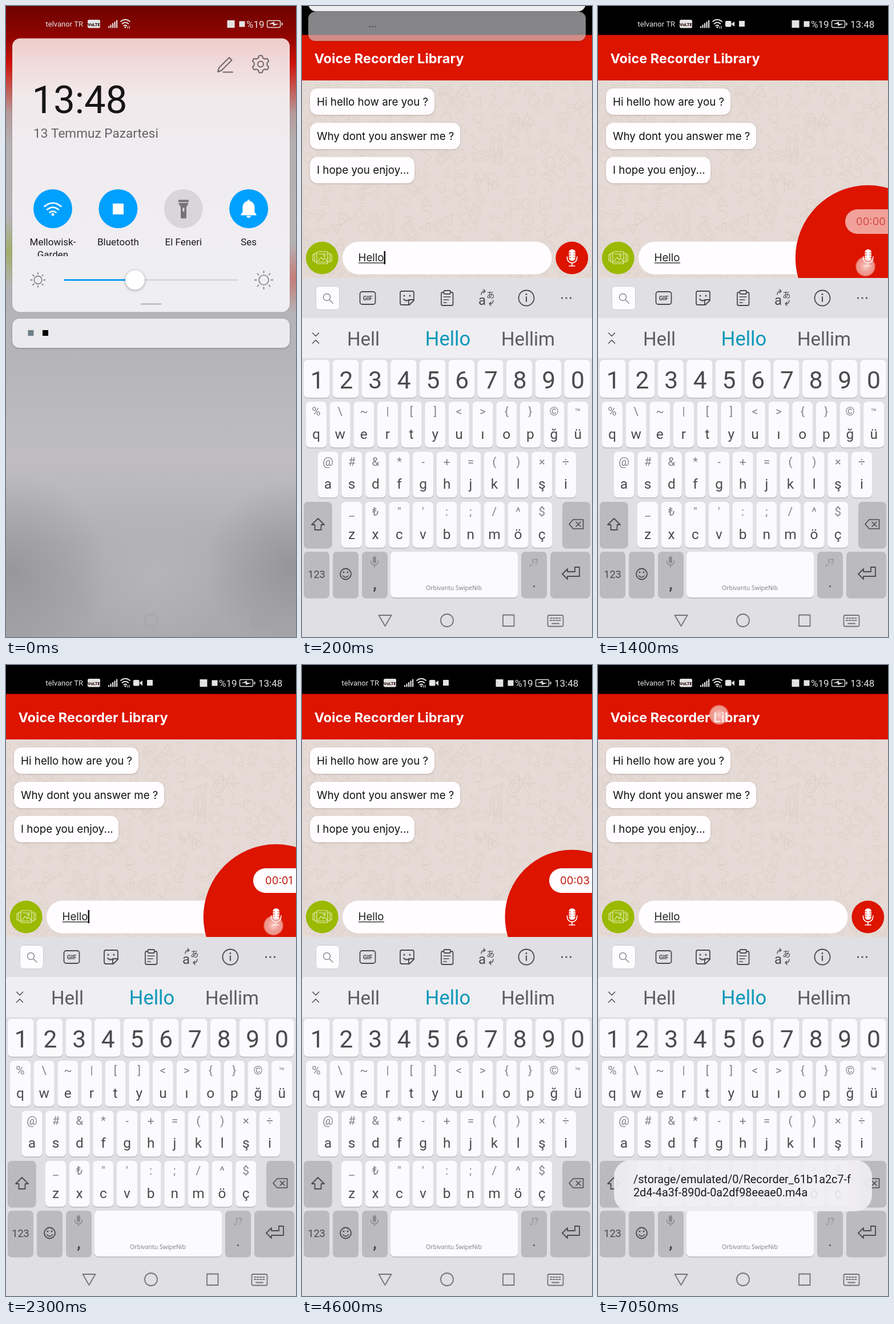
These frames come from a looping animation (508 px wide and 1102 px high, 7100 ms). An HTML page with a canvas:

```html
<!DOCTYPE html>
<html lang="en">
<head>
<meta charset="utf-8">
<title>Voice Recorder Library</title>
<style>
html, body { margin: 0; width: 100%; height: 100%; overflow: hidden; background: #000; }
canvas { display: block; }
</style>
</head>
<body>
<canvas id="stage" width="508" height="1102"></canvas>
<script>
const W = 508, H = 1102, LOOP = 7100;
const RED = '#dc1400', KEY = '#fbfafd', DARK_KEY = '#bbbabe', INK = '#4b4b4e', BLUE = '#00a0ff';
const UI = 'Roboto, sans-serif', CHAT = 'Inter, sans-serif';
const stage = document.getElementById('stage').getContext('2d');
let g = stage;

// ---------- helpers ----------
const clamp = v => Math.max(0, Math.min(1, v));
const ramp = (t, from, to) => clamp((t - from) / (to - from));
const ease = p => 0.5 - 0.5 * Math.cos(Math.PI * p);

function layer(draw) {
  const c = document.createElement('canvas');
  c.width = W; c.height = H;
  g = c.getContext('2d');
  draw();
  g = stage;
  return c;
}
function rect(x, y, w, h, fill) { g.fillStyle = fill; g.fillRect(x, y, w, h); }
function box(x, y, w, h, r, fill) {
  g.beginPath(); g.roundRect(x, y, w, h, r);
  g.fillStyle = fill; g.fill();
}
function dot(x, y, r, fill) {
  g.beginPath(); g.arc(x, y, r, 0, 7);
  g.fillStyle = fill; g.fill();
}
function line(d, color, width = 1.8) {
  g.strokeStyle = color; g.lineWidth = width;
  g.lineCap = g.lineJoin = 'round';
  g.stroke(new Path2D(d));
}
function shape(d, fill) { g.fillStyle = fill; g.fill(new Path2D(d)); }
function ring(x, y, r, color, width = 1.8) {
  g.beginPath(); g.arc(x, y, r, 0, 7);
  g.strokeStyle = color; g.lineWidth = width; g.stroke();
}
function frame(x, y, w, h, r, color, width = 1.8) {
  g.beginPath(); g.roundRect(x, y, w, h, r);
  g.strokeStyle = color; g.lineWidth = width; g.stroke();
}
function text(s, x, y, size, color, { font = UI, weight = 400, align = 'left' } = {}) {
  g.font = `${weight} ${size}px ${font}`;
  g.textAlign = align; g.fillStyle = color;
  g.fillText(s, x, y);
}
const center = (s, x, y, size, color, opt) => text(s, x, y, size, color, { align: 'center', ...opt });
function gradient(y0, y1, stops) {
  const f = g.createLinearGradient(0, y0, 0, y1);
  stops.forEach(([at, color]) => f.addColorStop(at, color));
  return f;
}
function glow(x, y, r, rgb, alpha) {
  const f = g.createRadialGradient(x, y, 0, x, y, r);
  f.addColorStop(0, `rgba(${rgb},${alpha})`);
  f.addColorStop(1, `rgba(${rgb},0)`);
  rect(x - r, y - r, 2 * r, 2 * r, f);
}
function shadowed(blur, dy, color, draw) {
  g.save();
  g.shadowBlur = blur; g.shadowOffsetY = dy; g.shadowColor = color;
  draw();
  g.restore();
}
function faded(alpha, draw) {
  if (alpha <= 0) return;
  g.save(); g.globalAlpha *= alpha; draw(); g.restore();
}

// ---------- chat screen ----------
function doodles() {
  let seed = 11;
  const rnd = n => (seed = seed * 16807 % 2147483647) / 2147483647 * n;
  const kinds = [
    'M-9 0a9 9 0 1 0 18 0a9 9 0 1 0-18 0M-4 2q4 5 8 0',
    'M-14-8h28v16h-28zM-10-4h20v8h-20z',
    'M-14 4q5-14 10-2t10-2t8 0',
    'M-12-3q6-9 12 0t12 0M-12 3q6-9 12 0t12 0',
    'M-10 8l8-18 12 14zM-3-1l6 5',
    'M-8-9h14v12q-7 8-14 0zM6-6q7 0 5 6t-5 2'
  ];
  g.save();
  g.beginPath(); g.rect(0, 130, W, 345); g.clip();
  for (let row = 0; row < 14; row++) for (let col = 0; col < 18; col++) {
    g.save();
    g.translate(col * 30 + rnd(16), 136 + row * 25 + rnd(14));
    g.rotate(rnd(6.28));
    const s = 0.7 + rnd(0.5);
    g.scale(s, s);
    line(kinds[Math.floor(rnd(kinds.length))], 'rgba(200,184,177,.27)', 1.3);
    g.restore();
  }
  g.restore();
}

function message(s, y, w) {
  shadowed(3, 1, 'rgba(120,100,90,.35)', () => box(14, y, w, 46, 13, '#fffdff'));
  text(s, 26, y + 29.5, 18.8, '#111', { font: CHAT });
}

const chat = layer(() => {
  rect(0, 0, W, 51, '#000');
  rect(0, 50.5, W, 79.5, RED);
  text('Voice Recorder Library', 21.5, 100, 23.5, '#fff', { font: CHAT, weight: 700 });
  rect(0, 130, W, 345, '#e5dad5');
  doodles();
  message('Hi hello how are you ?', 144, 218);
  message('Why dont you answer me ?', 204, 263);
  message('I hope you enjoy...', 263.5, 183);
  box(71, 411.5, 366.5, 57, 28.5, '#fffdff');
  text('Hello', 98.5, 446, 18.7, '#222', { font: CHAT });
  rect(99, 448, 45, 1.3, '#222');
  dot(35.2, 440, 28.4, '#9ab900');
  frame(26, 429, 19, 21, 2, '#e8f0c4', 1.2);
  line('M26 432h-4v15h4M22 434h-3v11h3M45 432h4v15h-4M49 434h3v11h-3M28 446l5-7 4 4 3-3 4 6M29 433h13M29 447h13', '#e8f0c4', 1.1);
  ring(39, 436, 1.8, '#e8f0c4', 1);
});

function mic() {
  box(467.5, 425, 11.5, 20, 5.5, '#fff');
  line('M467 431h4M467 435h4M467 439h4M476 431h4M476 435h4M476 439h4', RED, 1.1);
  line('M464.5 438v2a8.6 8.6 0 0 0 17.2 0v-2M473 449v5M468 454h10', '#fff', 1.7);
}

// ---------- keyboard ----------
function key(x, y, w, h, fill = KEY) {
  box(x, y + 1.5, w, h, 7, '#b9b8bd');
  box(x, y, w, h, 7, fill);
}
function letterRow(letters, symbols, x, y) {
  [...letters].forEach((ch, i) => {
    const cx = x + i * 41.65;
    key(cx - 18, y, 36, 80);
    center(symbols[i], cx, y + 24, symbols[i] === '™' ? 17 : 21, '#858488');
    center(ch, cx, y + 64.5, 24.5, INK);
  });
}

const keyboard = layer(() => {
  rect(0, 475, W, H - 475, '#e0dfe3');
  rect(0, 545, W, 70, '#efeef2');

  box(24, 489, 42, 42, 7, '#fdfcff');
  frame(24.5, 489.5, 41, 41, 7, '#cccbd0', 1);
  ring(43.5, 508.5, 6, '#8b8a8e', 1.5);
  line('M48 513l6 6', '#8b8a8e', 1.5);
  frame(101.5, 499, 27, 22, 4, INK);
  center('GIF', 115, 514, 11, INK, { weight: 700 });
  line('M175 498h18q3 0 3 3v13l-8 8h-13q-3 0-3-3v-18q0-3 3-3M196 513h-6q-3 0-3 3v6M178 512q5 5 9 1', INK);
  dot(179, 506, 1.5, INK); dot(189, 506, 1.5, INK);
  frame(244, 500, 20.5, 23, 2.5, INK);
  box(248.5, 497, 11.5, 6, 2, '#e0dfe3');
  frame(248.5, 497, 11.5, 6, 2, INK);
  line('M248 508h12M248 513h9M248 518h5', INK, 1.5);
  text('a', 309, 522, 24, INK);
  text('あ', 323, 510, 14.5, INK, { font: '"Noto Sans CJK JP", sans-serif' });
  line('M314 504q0-6 6-6M318 495l3 3-3 3M335 514q0 6-6 6M331 517l-3 3 3 3', INK, 1.4);
  ring(393, 510, 13.5, INK);
  line('M393 508v8', INK, 2); dot(393, 503.5, 1.4, INK);
  [455.5, 463, 470.5].forEach(x => dot(x, 510, 1.6, INK));

  line('M18.5 571l5.5 5.5 5.5-5.5M18.5 589l5.5-5.5 5.5 5.5', INK, 1.5);
  center('Hell', 107.5, 592.5, 33, '#5c5b5f');
  center('Hello', 255.5, 592.5, 34.5, '#0b97b8');
  center('Hellim', 396, 592.5, 33, '#5c5b5f');

  [...'1234567890'].forEach((ch, i) => {
    const x = 3 + i * 50.7;
    key(x, 618, 45.5, 66);
    center(ch, x + 23.7, 668, 42.5, INK);
  });
  letterRow('qwertyuıopğü', '%\\~|[]<>{}©™', 25, 691);
  letterRow('asdfghjklşi', '@#&*-+=()×÷', 45.5, 778.5);
  letterRow('zxcvbnmöç', '_₺"\':;/^$', 87, 866);

  key(3, 866, 49.5, 80, DARK_KEY);
  line('M28 895l-11 11h5.5v9h11v-9h5.5z', INK);
  key(456, 866, 49, 80, DARK_KEY);
  line('M468 905l7-8h17.5v16h-17.5zM480 901l8 8M488 901l-8 8', INK, 1.6);
  key(3, 953, 45, 80, DARK_KEY);
  center('123', 25.5, 999, 18, INK);
  key(54, 953, 45, 80, DARK_KEY);
  ring(76.5, 992, 9.5, INK);
  line('M71.5 995q5 5 10 0', INK, 1.5);
  dot(73, 989, 1.4, INK); dot(80, 989, 1.4, INK);
  key(105, 953, 45, 80, DARK_KEY);
  box(124, 961, 6, 12, 3, '#8b8a8e');
  line('M120.5 969q0 7 6.5 7t6.5-7M127 976v4', '#8b8a8e', 1.5);
  center(',', 127.5, 1018, 27, INK, { weight: 700 });
  key(155, 953, 223, 80);
  center('Orbivantu SwipeNib', 266, 1020, 10.5, '#7d7c80', { font: '"Open Sans", sans-serif' });
  key(384, 953, 45, 80, DARK_KEY);
  center(',!?', 406.5, 977, 16, '#8b8a8e');
  center('.', 406.5, 1015, 25, INK);
  key(435, 953, 70, 80, DARK_KEY);
  line('M456 992l9-9v5h13v-8h8v16h-21v5z', INK);

  navigation();
});

function navigation() {
  const c = '#757478';
  line('M134.5 1064h22l-11 19z', c);
  ring(254, 1073, 11, c);
  frame(352, 1063.5, 19.5, 19.5, 0, c);
  keyboardIcon(c);
}
function keyboardIcon(c) {
  frame(430.5, 1064, 27, 19.5, 2.5, c);
  g.setLineDash([2.5, 2.5]);
  line('M435 1069h19M435 1073h19', c, 2);
  g.setLineDash([]);
  line('M438 1078.5h12', c, 1.8);
}

// ---------- status bar ----------
function statusLeft() {
  const c = '#e4e2e2';
  text('telvanor TR', 69.5, 36, 13, c);
  box(143, 24, 22, 14.5, 2.5, c);
  center('VoLTE', 154, 34.5, 7.8, '#200', { weight: 700 });
  for (let i = 0; i < 5; i++) box(179 + i * 3.5, 35 - i * 2.6, 2.2, 3.5 + i * 2.6, 1, c);
  line('M201 27q8-6.5 16 0M203.5 31q5.5-4.5 11 0M206.5 34.5q2.5-2 5 0', c, 1.9);
  dot(209, 37, 1.6, c);
  line('M213 36v3M216 35v4', c, 1.2);
}
function statusRight(dx) {
  const c = '#e4e2e2';
  g.save(); g.translate(dx, 0);
  rect(339.5, 25, 13, 13, c);
  rect(360.5, 26.5, 10, 10, c);
  text('%19', 373, 37.5, 17, c);
  frame(409.5, 25.5, 23, 12, 2.5, c, 1.4);
  box(434.5, 29, 2, 5, 1, c);
  shape('M412 31.5l10-4v3.500h8l-10 4v-3.500z', c);
  g.restore();
}
function statusFull() {
  statusLeft();
  box(223, 26, 10.5, 10.5, 2, '#e4e2e2');
  shape('M234 31l5-4v9l-5-4z', '#e4e2e2');
  rect(247, 26, 10, 10, '#e4e2e2');
  statusRight(0);
  text('13:48', 442, 37.5, 17, '#e4e2e2');
}

// ---------- notification shade ----------
const blurred = layer(() => {
  rect(0, 0, W, H, gradient(0, H, [
    [0, '#6d0300'], [.05, '#920500'], [.09, '#cc1209'], [.12, '#c9453d'],
    [.17, '#b59a9a'], [.22, '#b3b0b2'], [.55, '#b5b4b6'], [.72, '#bfbdc0'], [.85, '#b0afb2'], [1, '#a9a8ab']
  ]));
  glow(0, 430, 60, '150,170,70', .7);
  glow(508, 475, 60, '215,70,60', .5);
  glow(10, 990, 170, '130,129,132', .5);
  glow(500, 980, 150, '130,129,132', .55);
  glow(260, 1000, 130, '188,187,190', .5);
  statusLeft();
  statusRight(48);
  ring(254, 1073, 11, '#a6a5a8');
  keyboardIcon('#a1a0a3');
});

function sun(x, y, r) {
  ring(x, y, r, '#858387', 1.7);
  for (let i = 0; i < 8; i++) {
    const c = Math.cos(i * Math.PI / 4), s = Math.sin(i * Math.PI / 4);
    line(`M${x + c * r * 1.5} ${y + s * r * 1.5}L${x + c * r * 1.85} ${y + s * r * 1.85}`, '#858387', 1.8);
  }
}

const panel = layer(() => {
  shadowed(2, 0, 'rgba(60,40,40,.2)', () => box(11, 56.5, 486, 478, 14,
    gradient(57, 534, [[0, '#eeccc8'], [.09, '#f1dadb'], [.2, '#f1e8ea'], [.45, '#f0edf1'], [1, '#efeef1']])));
  line('M371 115l2-7 18-18 4.500 4.500-18 18zM380.500 115.500h16.500', '#6d676a', 2);
  let gear = '';
  for (let i = 0; i <= 96; i++) {
    const a = i * Math.PI / 48, r = 13.2 + 1.9 * Math.tanh(3 * Math.cos(a * 6 + Math.PI));
    gear += `${i ? 'L' : 'M'}${446 + r * Math.cos(a)} ${101.5 + r * Math.sin(a)}`;
  }
  line(gear, '#6d676a', 2);
  ring(446, 101.5, 5, '#6d676a', 2);
  text('13:48', 45.5, 187, 67, '#161415');
  text('13 Temmuz Pazartesi', 48, 230, 22.6, '#656265');

  const labels = ['Mellowisk-', 'Bluetooth', 'El Feneri', 'Ses'];
  labels.forEach((label, i) => {
    const x = 82 + i * 114.4;
    dot(x, 354, 34, i === 2 ? '#d8d6d9' : BLUE);
    center(label, x, 418, 17, '#1c1a1c');
  });
  g.save();
  g.beginPath(); g.rect(20, 424, 130, 13); g.clip();
  center('Garden', 82, 440, 17, '#1c1a1c');
  g.restore();

  line('M67.500 350q14.500-12 29 0M72 355.500q10-8 20 0M76.500 360.500q5.500-4 11 0', '#fff', 2.6);
  dot(82, 364, 2.5, '#fff');
  rect(187, 345, 19, 19, '#fff');
  shape('M302 338.500h18v4h-18zM302 344h18l-4 7v18q0 2-2 2h-6q-2 0-2-2v-18z', '#757377');
  box(309.5, 352, 3, 7, 1.5, '#d8d6d9');
  shape('M425 338q2 0 2 2.500q8.500 2 8.500 11.500v8l3 4v1.500h-27v-1.500l3-4v-8q0-9.500 8.500-11.500q0-2.500 2-2.500M421 366.500h8q-1 3.500-4 3.500t-4-3.500', '#fff');

  sun(56, 478.5, 6.8);
  sun(451.5, 478.5, 8.5);
  line('M103 478.500H405', '#d9d7da', 3);
  line('M103 478.500H226', '#12a0f0', 3);
  shadowed(5, 1, 'rgba(0,0,0,.35)', () => dot(226, 478.5, 17, '#fff'));
  line('M237 520.500h34', '#c3c1c5', 3);
});

function notice(collapsed) {
  shadowed(3, 1, 'rgba(60,60,60,.4)', () => box(11, 546, 486, 51, 12, '#ebeaec'));
  if (collapsed) [118.5, 123.5, 128.5].forEach(x => dot(x, 572, 1.4, '#333'));
  else {
    rect(38.5, 566, 10, 10, '#6f7f8a');
    rect(64, 566, 10, 10, '#000');
  }
}

function shade(t) {
  if (t >= 300) return;
  const p = ease(ramp(t, 30, 200));
  const lift = Math.max(0, t - 200);
  faded(1 - p, () => g.drawImage(blurred, 0, 0));
  g.drawImage(panel, 0, -524 * p - lift);
  faded((1 - .45 * p) * ramp(t, 300, 200), () => {
    g.translate(0, -535 * p - lift);
    notice(p > .8);
  });
}

// ---------- recording ----------
function cursorOn(t) {
  if (t < 4900) return (t + 100) % 1000 < 500;
  return t < 5600 || (t >= 6100 && t < 6600);
}
function touch(x, y) {
  const f = g.createRadialGradient(x, y, 0, x, y, 18);
  f.addColorStop(0, 'rgba(255,240,238,.85)');
  f.addColorStop(.6, 'rgba(246,212,208,.7)');
  f.addColorStop(.85, 'rgba(255,232,230,.6)');
  f.addColorStop(1, 'rgba(255,255,255,0)');
  dot(x, y, 18, f);
}
function timer(t) {
  const seconds = Math.max(0, Math.min(3, Math.floor((t - 1050) / 1000)));
  faded(ramp(t, 1100, 1600) * ramp(t, 5350, 5100), () => {
    box(433, 355, 100, 43, 21.5, '#fffdff');
    center('00:0' + seconds, 478, 382.5, 18.5, '#c0160a', { font: CHAT });
  });
}
function toast(t) {
  faded(ramp(t, 5050, 5200), () => {
    box(28, 865, 452, 89, 28, 'rgba(239,238,242,.92)');
    text('/storage/emulated/0/Recorder_61b1a2c7-f', 62, 905, 19.8, '#1c1c1f');
    text('2d4-4a3f-890d-0a2df98eeae0.m4a', 62, 928, 19.8, '#1c1c1f');
  });
}

function render(t) {
  g.drawImage(chat, 0, 0);
  faded(ramp(t, 250, 450), statusFull);
  if (cursorOn(t)) rect(143.5, 428, 2.6, 23, '#111');
  const grow = ease(ramp(t, 767, 1067)) - ease(ramp(t, 4530, 4880));
  dot(472.8, 440, 28.4 + 98.6 * grow, RED);
  mic();
  timer(t);
  if (t >= 720 && t < 4550) touch(468.5, 455);
  if (t >= 7050) touch(212, 87);
  g.drawImage(keyboard, 0, 0);
  toast(t);
  shade(t);
}

const start = performance.now();
function tick() {
  render((performance.now() - start) % LOOP);
  requestAnimationFrame(tick);
}
tick();
</script>
</body>
</html>
```
